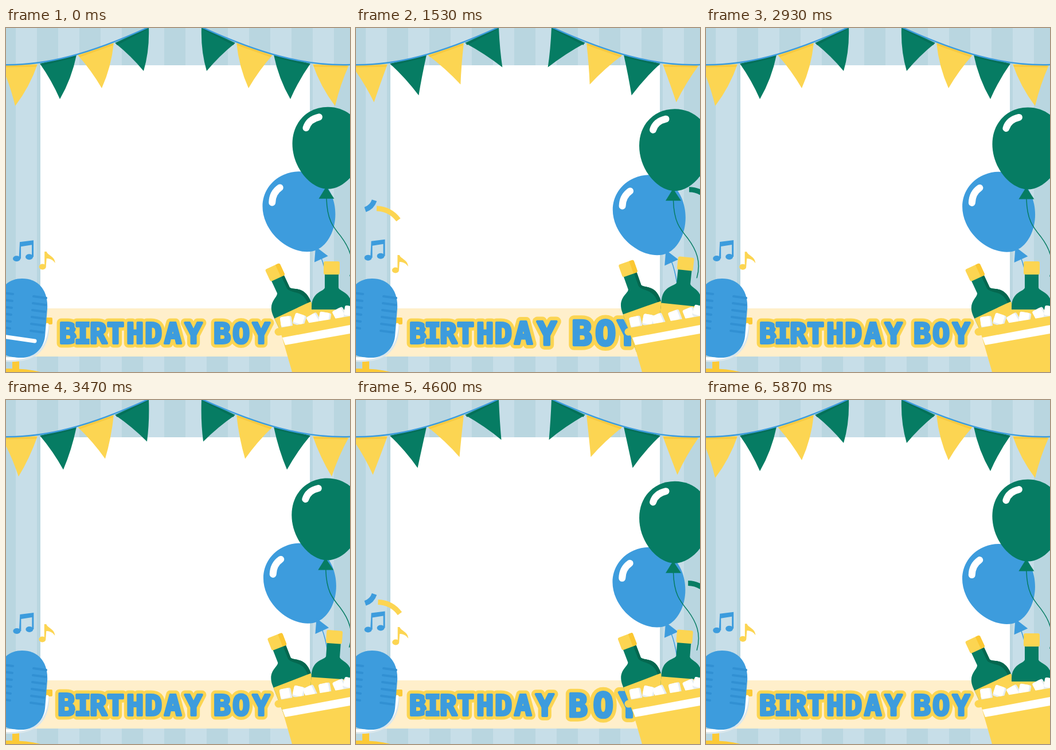
An HTML page that plays this animation: 600 by 600 pixels, repeating every 5.94 s.

```html
<!DOCTYPE html>
<html lang="en">
<head>
<meta charset="utf-8">
<title>Birthday Boy</title>
<style>
html, body { margin: 0; width: 100%; height: 100%; overflow: hidden; background: #c7dee8; }
svg { display: block; width: 100vw; height: 100vh; }
text { font: bold 50px "DejaVu Sans Mono", monospace; text-anchor: middle; stroke-linejoin: round; }
.line { fill: none; stroke-linecap: round; }
.b { fill: #3d9cdd; } .g { fill: #067c63; } .y { fill: #fcd552; } .w { fill: #fff; }
</style>
</head>
<body>
<svg viewBox="0 0 600 600">
  <defs>
    <pattern id="stripes" x="-20" width="74" height="600" patternUnits="userSpaceOnUse">
      <rect width="74" height="600" fill="#c7dee8"/>
      <rect width="37" height="600" fill="#b9d6e0"/>
    </pattern>
    <path id="balloon" d="M-62-7C-62-45-35-71 0-71S62-45 62-7C62 35 30 72 0 72S-62 35-62-7Z"/>
    <g id="bottle">
      <path class="g" d="M-12-72V-47C-14-40-34-40-35-15V60H35V-15C34-40 14-40 12-47V-72Z"/>
      <path class="y" d="M-35-9H35V60H-35Z"/>
      <rect class="y" x="-14" y="-93" width="28" height="23" rx="3"/>
    </g>
    <g id="cube">
      <rect x="-10" y="-10" width="20" height="20" rx="3" fill="#e6edf0"/>
      <rect x="-10" y="-10" width="17" height="17" rx="3" class="w"/>
    </g>
  </defs>

  <rect width="600" height="600" fill="url(#stripes)"/>
  <rect class="w" x="60" y="65" width="470" height="424"/>
  <g id="confetti"></g>
  <rect x="40" y="489" width="460" height="84" fill="#ffefcb"/>

  <g id="buntingLeft"></g>
  <g id="buntingRight" transform="matrix(-1 0 0 1 590 0)"></g>

  <g id="blueBalloon">
    <path class="line" stroke="#3d9cdd" stroke-width="1.5" d="M549 400Q555 415 559 440"/>
    <g class="b" transform="translate(512.500 320.500) rotate(-24)">
      <use href="#balloon"/><path d="M0 66L-13 90H13Z"/>
    </g>
    <path class="line" stroke="#fff" stroke-width="12" d="M463.500 304Q464 287 477 278"/>
  </g>
  <g id="greenBalloon">
    <path class="line" stroke="#067c63" stroke-width="1.5" d="M559 298C560 335 570 347 584 364C599 384 608 405 600 433"/>
    <g class="g" transform="translate(561.500 209.500)">
      <use href="#balloon"/><path d="M-3 68L-16 89H11Z"/>
    </g>
    <path class="line" stroke="#fff" stroke-width="12" d="M523.500 175Q528 160 546 156"/>
  </g>

  <g id="outlines" fill="#fcd552" stroke="#fcd552" stroke-width="15"></g>
  <g id="letters"></g>

  <g id="bottleLeft">
    <use href="#bottle"/>
    <path fill="#04674f" d="M12-47C14-40 34-40 35-15V-9H29V-13C28-34 10-36 7-47V-70H12Z"/>
    <path fill="#fbc732" d="M6-93H11Q14-93 14-90V-73Q14-70 11-70H6Z"/>
  </g>
  <use id="bottleRight" href="#bottle"/>
  <g id="ice"></g>
  <path class="y" d="M480 534L600 512V600H499Z"/>
  <path class="w" d="M482 540L600 518V533L487 553Z"/>
  <path class="line" stroke="#fcd552" stroke-width="13" d="M475 530L606 508"/>

  <g id="blueNote" class="b">
    <ellipse cx="18.500" cy="402" rx="6.500" ry="5"/><ellipse cx="40.500" cy="399" rx="6.500" ry="5"/>
    <path d="M24 373L48 370V399H45V378L26 381V402H22.500Z"/>
  </g>
  <g id="yellowNote" class="y">
    <ellipse cx="63.500" cy="416.500" rx="6" ry="5"/>
    <path d="M67 390H70.500C73 397 85 398 85.500 410C81 403 75 402 70.500 402L69.500 416H67Z"/>
  </g>

  <g id="mic">
    <path d="M11 575H23V600H11ZM-5 594Q35 593 60 600H-5Z" fill="#fcca36"/>
    <rect x="66" y="505" width="15" height="12" rx="2" fill="#fcca36"/>
    <path class="line" stroke="#dbe7ec" stroke-width="5" d="M73 519C73 560 50 584 -5 579"/>
    <path class="line" stroke="#fff" stroke-width="5" d="M72 517C70 556 48 581 -5 576"/>
    <path class="b" d="M-12 470C-7 446 10 437 28 437C56 437 74 457 72 490L68 538C65 563 45 576 25 575C8 574-10 572-12 555Z"/>
    <g id="slats" class="line" stroke="#3190d3" stroke-width="4"></g>
    <path id="micBand" class="line" stroke="#fff" stroke-width="7" d="M-5 538L50 546"/>
  </g>
</svg>
<script>
const LOOP = 5940, CYCLE = 3000, TICK = 200 / 3, BAND_GONE = 1330;
const $ = id => document.getElementById(id);

function add(parent, tag, attrs, text) {
  const el = document.createElementNS('http://www.w3.org/2000/svg', tag);
  for (const key in attrs) el.setAttribute(key, attrs[key]);
  if (text) el.textContent = text;
  return parent.appendChild(el);
}
const place = (el, x, y, turn = 0) =>
  el.setAttribute('transform', `translate(${x.toFixed(2)} ${y.toFixed(2)}) rotate(${turn.toFixed(2)})`);
const mix = (a, b, k) => a + (b - a) * k;
// One there-and-back swing, then rest.
const swing = (t, period) => t < period ? (1 - Math.cos(2 * Math.PI * t / period)) / 2 : 0;
// Continuous sway, highest at the given moment of the cycle.
const sway = (t, peak) => Math.cos(2 * Math.PI * (t - peak) / 3);

function track(keys, t) {
  let i = 1;
  while (i < keys.length - 1 && t > keys[i][0]) i++;
  const [t0, a] = keys[i - 1], [t1, b] = keys[i];
  return mix(a, b, (t - t0) / (t1 - t0));
}

// Bunting: two top corners and the resting tip.
const flagSpecs = [
  [-8, 65, 55, 63, 16, 136], [59, 62, 123, 47, 94, 124],
  [125, 47, 188, 26, 167, 105], [190, 26, 249, -2, 240, 75]
];
const flags = [];
for (const side of ['buntingLeft', 'buntingRight']) {
  flagSpecs.forEach((spec, i) => {
    const [x1, y1, x2, y2] = spec;
    const path = add($(side), 'path', { class: i % 2 ? 'g' : 'y' });
    add($(side), 'path', {
      d: `M${x1 + 4} ${y1 + 2}L${x2 - 3} ${y2 + 3}`, class: 'line',
      stroke: i % 2 ? '#056f58' : '#f8c93f', 'stroke-width': 3
    });
    flags.push({ path, spec });
  });
  add($(side), 'path', {
    d: 'M-12 64C70 67 150 44 252 -3', class: 'line', stroke: '#3d9cdd', 'stroke-width': 2.500
  });
}
function drawFlag({ path, spec: [x1, y1, x2, y2, tx, ty] }, k) {
  const x = tx + 18 * k, y = ty - 7.500 * k;
  path.setAttribute('d', `M${x1} ${y1}L${x2} ${y2}Q${(x2 + tx) / 2 + 6} ${(y2 + y) / 2 + 3} ${x} ${y}` +
    `Q${(x1 + x) / 2 + 3} ${(y1 + y) / 2 - 2} ${x1} ${y1}`);
}

// Lettering: each glyph grows about the centre of the line.
const centers = [108, 134, 161, 191, 225, 257, 291, 327, 377, 410, 445];
const letters = [...'BIRTHDAYBOY'].map((char, i) => {
  const pos = { x: centers[i] - 277, y: 18 };
  const outline = add($('outlines'), 'text', pos, char);
  const face = add($('letters'), 'g', {});
  add(face, 'text', { ...pos, fill: '#fcd552', stroke: '#fcd552', 'stroke-width': 7 }, char);
  add(face, 'text', { ...pos, fill: '#3d9cdd', stroke: '#3d9cdd', 'stroke-width': 4 }, char);
  return { outline, face, peak: 0.78 + 0.08 * i };
});

// Confetti: colour, curve about its centre, position, drift before and after.
const fall = [[0.500, -208], [0.900, -72], [1.130, 0], [2.200, 404], [2.500, 520]];
const confetti = [
  ['#fcd552', 'M-20-9Q4-8 18 11', 47, 184, -10, 26],
  ['#3d9cdd', 'M-9 8Q3 4 7-8', 25, 169, -17, 0],
  ['#3d9cdd', 'M-16 6Q6 3 16-10', 555, 126, 15, -20],
  ['#067c63', 'M-12-4Q6-4 20 10', 600, 146, -6, -20]
].map(([stroke, d, x, y, before, after]) => ({
  el: add($('confetti'), 'path', { d, stroke, fill: 'none', 'stroke-width': 9 }),
  x, y, drift: [[0.500, before * 2.500], [0.900, before], [1.130, 0], [2.200, after]]
}));

// Ice: x, y, turn at rest and when the bottles are lifted.
const ice = [
  [489, 513, -8, 487, 513, -15], [512, 509, 18, 509, 510, 5], [537, 509, -30, 521, 509, -20],
  [556, 506, 10, 557, 501, -40], [582, 499, -28, 582, 498, -18], [600, 495, 8, 597, 494, 20]
].map(pose => ({ el: add($('ice'), 'use', { href: '#cube' }), pose }));

for (let i = 0; i < 6; i++) {
  const y = 464 + 12 * i;
  add($('slats'), 'path', { d: `M-5 ${y - 2}L${12 - i} ${y}M${48 - i} ${y + 4}L${70 - i} ${y + 7}` });
}

function draw(ms) {
  // The first pass steps every 100 ms, the second at fifteen per second.
  const tick = Math.floor((ms + 5) / TICK);
  const t = (ms < CYCLE - 4 ? Math.floor(tick * 2 / 3 + 0.01) * 100 : tick * TICK - CYCLE) / 1000;

  const flap = swing(t, 2.400);
  flags.forEach(flag => drawFlag(flag, flap));

  place($('greenBalloon'), -2.750 + 2.750 * sway(t, 0), 1 - 3 * sway(t, 0.470));
  place($('blueBalloon'), 0.900 + 1.700 * sway(t, 0.800), 3.400 - 3.700 * sway(t, 0.300));
  place($('blueNote'), 1.300 - 1.300 * sway(t, 0.1), -0.500 + 1.500 * sway(t, 0.500));
  place($('yellowNote'), 2.800 - 3.200 * sway(t, 0.300), 3 - 3 * sway(t, 0.050));

  const lift = swing(t, 2.100);
  place($('bottleLeft'), mix(503.700, 500.500, lift), mix(500, 494, lift), mix(-25, -16, lift));
  place($('bottleRight'), mix(568, 565, lift), mix(500, 487, lift), mix(0, 10, lift));
  for (const { el, pose: p } of ice) {
    place(el, mix(p[0], p[3], lift), mix(p[1], p[4], lift), mix(p[2], p[5], lift));
  }

  for (const { outline, face, peak } of letters) {
    const d = (t - peak) / 0.380;
    const scale = Math.abs(d) < 1 ? 1 + 0.190 * Math.cos(Math.PI * d / 2) ** 2 : 1;
    const transform = `translate(277 532) scale(${scale.toFixed(4)})`;
    outline.setAttribute('transform', transform);
    face.setAttribute('transform', transform);
  }

  for (const { el, x, y, drift } of confetti) {
    el.style.display = t > 0.450 && t < 2.600 ? '' : 'none';
    place(el, x + track(drift, t), y + track(fall, t));
  }

  $('micBand').style.display = ms < BAND_GONE ? '' : 'none';
}

const start = performance.now();
function frame() {
  draw((performance.now() - start) % LOOP);
  requestAnimationFrame(frame);
}
frame();
</script>
</body>
</html>
```
